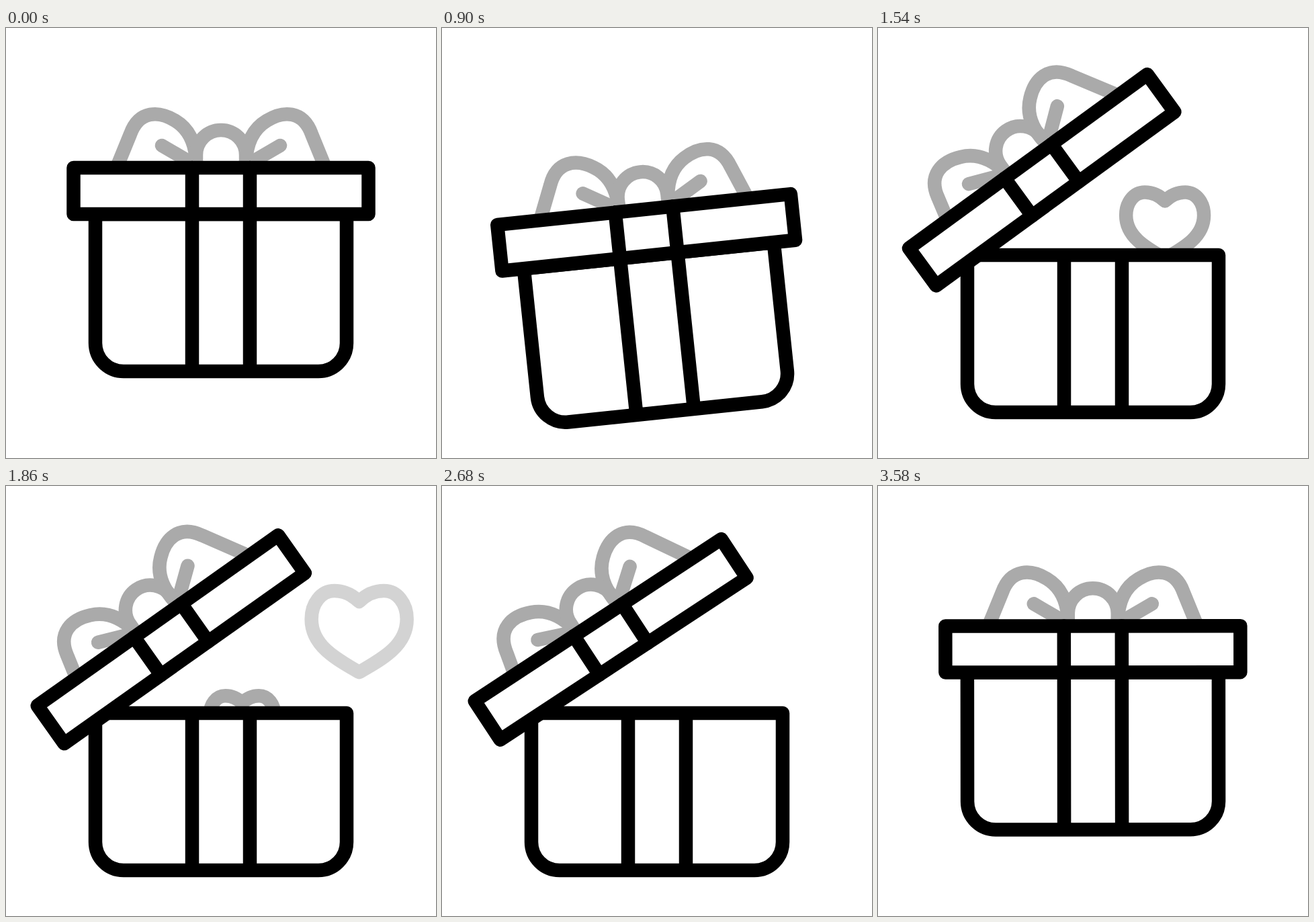
An HTML page for the animation above (3.6 s loop, 640x640 px).

```html
<!DOCTYPE html>
<html lang="en">
<head>
<meta charset="utf-8">
<title>Gift box</title>
<style>
  html, body { margin: 0; height: 100%; overflow: hidden; background: #fff; }
  svg { display: block; width: 100vw; height: 100vh; }
  path, rect { stroke-width: 20.5; stroke-linecap: round; stroke-linejoin: round; vector-effect: non-scaling-stroke; }
  .soft { fill: none; stroke: #aaa; }
  .bold { fill: #fff; stroke: #000; }
</style>
</head>
<body>
<svg viewBox="0 0 640 640">
  <defs>
    <g id="loop" class="soft">
      <path d="M156 229L185 158C198 122 228 123 252 138C272 150 282 170 283 200"/>
      <path d="M232 175L280 203"/>
    </g>
    <path id="heart" class="soft" d="M0-45C-12-57-25-61-37-61C-57-61-71-42-71-19C-71 20-35 40 0 60C35 40 71 20 71-19C71-42 57-61 37-61C25-61 12-57 0-45Z"/>
  </defs>
  <use class="heart" href="#heart"/>
  <use class="heart" href="#heart"/>
  <g id="box">
    <path class="bold" d="M133 277V469A42 42 0 0 0 175 511H465A42 42 0 0 0 507 469V277ZM277 277V511M363 277V511"/>
    <g id="lid">
      <g id="left"><use href="#loop"/></g>
      <g id="right"><use href="#loop" transform="matrix(-1 0 0 1 640 0)"/></g>
      <path class="soft" d="M283 202V189A37 37 0 0 1 357 189V202"/>
      <rect class="bold" x="100.5" y="208" width="439" height="69"/>
      <path class="bold" d="M277 208V277M363 208V277"/>
    </g>
  </g>
</svg>
<script>
  const LOOP = 3600;
  const HEART_LIFE = 840;
  const byId = id => document.getElementById(id);
  const hearts = document.querySelectorAll('.heart');

  const clamp = x => Math.max(0, Math.min(1, x));
  const ease = p => p < 0.5 ? 2 * p * p : 1 - 2 * (1 - p) ** 2;
  const mix = (a, b, p) => a + (b - a) * p;
  const place = (el, transform) => el.setAttribute('transform', transform);

  // Hearts rise from behind the box, grow and fade
  function drawHeart(heart, age) {
    const p = clamp(age / HEART_LIFE), f = ease(p);
    const scale = mix(0.65, 1.015, f) * Math.max(0.01, clamp(p * 10));
    place(heart, `translate(${mix(338, 533.5, f)} ${mix(364, 211, f)}) scale(${scale})`);
    heart.setAttribute('opacity', p > 0 ? clamp((1 - p) / 0.28) : 0);
  }

  function draw(t) {
    // Eased step from 0 to 1
    const move = (start, length = 360) => ease(clamp((t - start) / length));
    const closing = move(2880), rising = move(3240), settling = move(1900, 600);

    const drop = 61 * (move(0, 380) - rising);
    const tilt = 10 * (move(0, 380) - 2 * move(380) + move(740) - closing + rising);
    const open = 43.5 * move(1000, 330) - 8.2 * move(1330, 270) - 2 * settling - 33.3 * closing;
    const lift = -6 * move(1000, 330) + 9 * move(1330, 270) - 3 * settling;
    const flop = -9 * move(1200, 300) + 16 * closing - 7 * rising;

    place(byId('box'), `translate(0 ${drop}) rotate(${tilt} 320 394)`);
    place(byId('lid'), `translate(0 ${lift}) rotate(${-open} 160 320)`);
    place(byId('left'), `rotate(${flop} 283 200)`);
    place(byId('right'), `rotate(${flop} 357 200)`);
    hearts.forEach((heart, i) => drawHeart(heart, t - 1140 - 565 * i));
  }

  const start = performance.now();
  function tick() {
    draw((performance.now() - start) % LOOP);
    requestAnimationFrame(tick);
  }
  tick();
</script>
</body>
</html>
```
